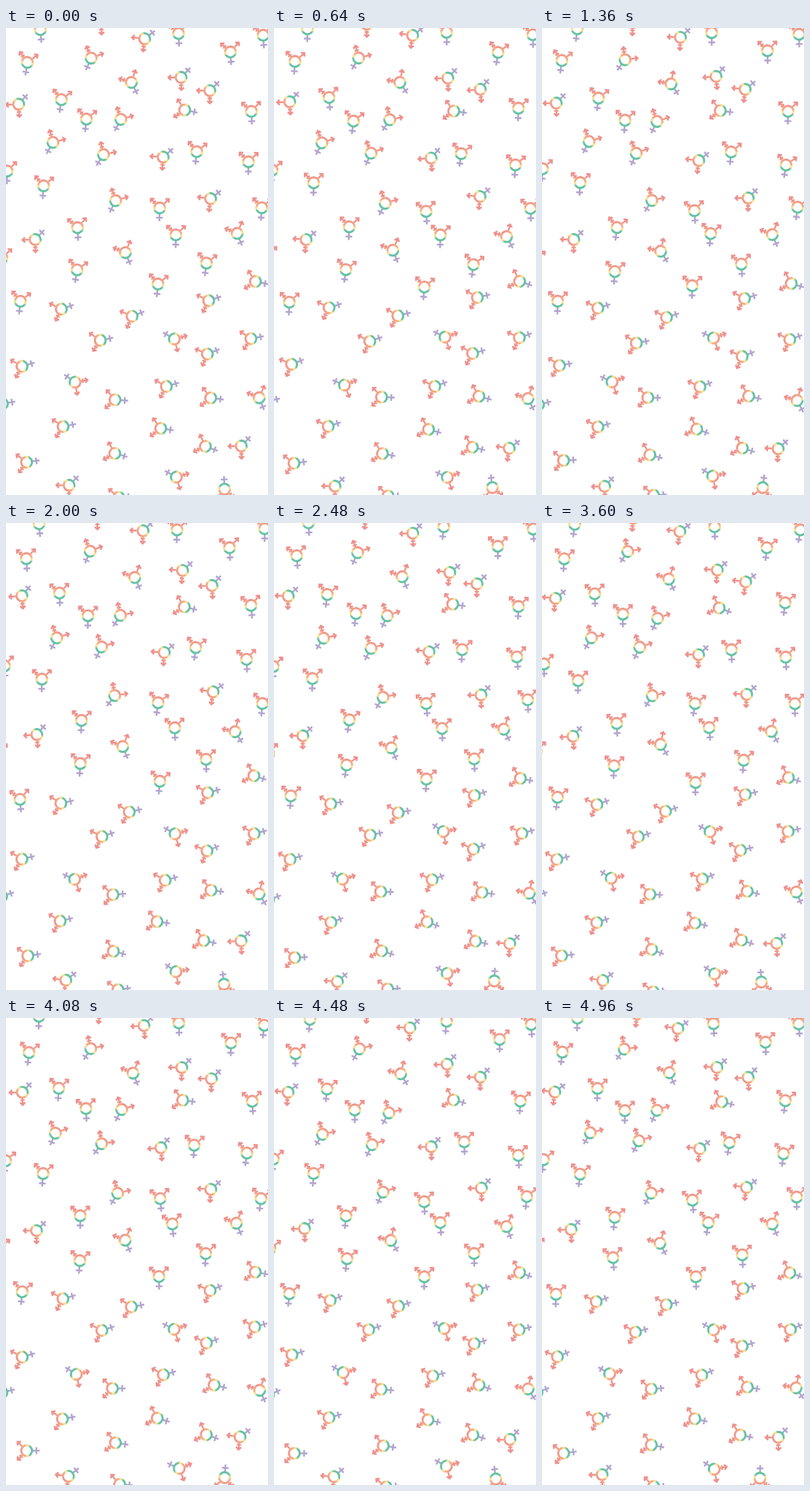
Recreate the animation shown at these times as an HTML page. Size 360 px wide and 640 px high, loop 5.04 s.

```html
<!DOCTYPE html>
<html lang="en">
<head>
<meta charset="utf-8">
<title>Jittering symbols</title>
<style>
  html, body { margin: 0; width: 100%; height: 100%; overflow: hidden; background: #fff; }
  svg { display: block; width: 100vw; height: 100vh; }
</style>
</head>
<body>
<svg id="stage" viewBox="0 0 360 640" preserveAspectRatio="none">
  <defs>
    <linearGradient id="bands" gradientUnits="userSpaceOnUse" x1="0" y1="-10" x2="0" y2="20">
      <stop offset=".05" stop-color="#ee908c"/>
      <stop offset=".16" stop-color="#f3a786"/>
      <stop offset=".27" stop-color="#f4ac88"/>
      <stop offset=".34" stop-color="#f9e192"/>
      <stop offset=".41" stop-color="#f5e494"/>
      <stop offset=".48" stop-color="#66c2a4"/>
      <stop offset=".61" stop-color="#66c2a4"/>
      <stop offset=".68" stop-color="#b3a3d0"/>
    </linearGradient>
    <g id="sign" fill="none" stroke="url(#bands)" stroke-width="2.4">
      <path d="M5.3-5.3 12.2-12.2M7.4-12.4H12.4V-7.4
        M-5.3-5.3-12.2-12.2M-7.4-12.4H-12.4V-7.4M-9.7-5.5-5.5-9.7"/>
      <circle r="7.4" stroke-width="2.9"/>
      <path d="M0 8V18M-4.6 13.4H4.6"/>
    </g>
  </defs>
</svg>
<script>
const STEP = 80, STEPS = 63, SHIFT = 2.8, TILT = 7;

// Each resting angle with the ring centres, x then y, of the signs that share it
const layout = [
  [2, 47,0, 235,7, 75,96, 112,125, 336,112, 209,249, 101,272, 231,282, 276,324, 209,353, 21,376,
    308,32, 354,8, 30,47, 260,172, 333,186, 0,194, 52,214, 350,245, -8,315, 100,331],
  [30, 158,128, 67,158, 115,41, 132,171, 152,239],
  [-28, 175,76, 317,284, 163,306, 348,508],
  [-76, 245,114, 340,348, 210,549, 148,585, 284,505, 274,573],
  [-92, 148,507, 28,594, 155,641],
  [-107, 275,448, 22,463, 219,489, -7,514, 76,548, 278,371, 77,386, 171,395, 130,429, 339,425],
  [119, 233,425, 95,487, 236,616],
  [180, 302,630],
  [227, 128,-8, 240,66, 281,83, 20,102, 283,233, 42,291, 322,575, 85,628, 189,12, 215,179]
];

const stage = document.getElementById("stage");
const signs = [];

for (const [angle, ...spots] of layout) {
  for (let i = 0; i < spots.length; i += 2) {
    const node = document.createElementNS(stage.namespaceURI, "use");
    node.setAttribute("href", "#sign");
    stage.append(node);
    signs.push({ node, angle, x: spots[i], y: spots[i + 1] });
  }
}

// Seeded noise in -1..1
function noise(a, b, c) {
  let h = Math.imul(a + 1, 374761393) ^ Math.imul(b + 1, 668265263) ^ Math.imul(c + 1, 1274126177);
  h = Math.imul(h ^ (h >>> 15), 2246822519);
  h = Math.imul(h ^ (h >>> 13), 3266489917);
  return ((h ^ (h >>> 16)) >>> 0) / 2147483648 - 1;
}

function draw(step) {
  signs.forEach(({ node, angle, x, y }, i) => {
    const px = x + SHIFT * noise(i, step, 0);
    const py = y + SHIFT * noise(i, step, 1);
    const turn = angle + TILT * noise(i, step, 2);
    node.setAttribute("transform",
      `translate(${px.toFixed(2)} ${py.toFixed(2)}) rotate(${turn.toFixed(2)})`);
  });
}

const start = performance.now();
let shown = -1;

function tick() {
  const step = Math.floor((performance.now() - start) / STEP) % STEPS;
  if (step !== shown) draw(shown = step);
  requestAnimationFrame(tick);
}
tick();
</script>
</body>
</html>
```
